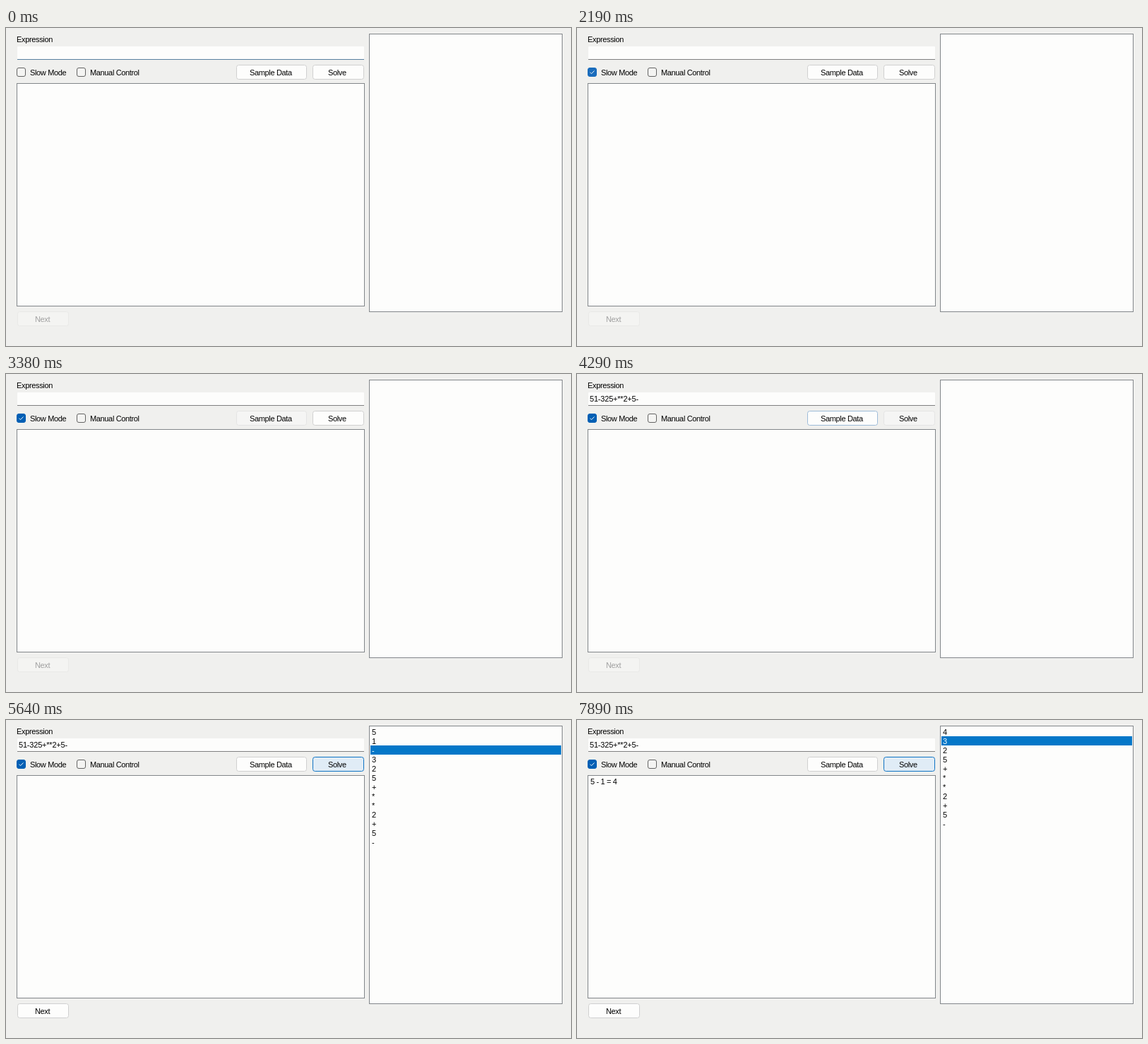
These frames come from a looping animation (800 px wide and 450 px high, 7.99 s). An HTML page:

```html
<!DOCTYPE html>
<html lang="en">
<head>
<meta charset="utf-8">
<title>Postfix solver</title>
<style>
  html, body { margin: 0; width: 100%; height: 100%; overflow: hidden; background: #f0f0ee; }
  svg { display: block; width: 800px; height: 450px; }
  text { font: 11px "Liberation Sans", Arial, sans-serif; letter-spacing: -.35px; fill: #000; white-space: pre; }
  .panel { fill: #fdfdfc; stroke: #82868a; }
  .box { fill: #f4f4f2; stroke: #636363; }
  .box.on { fill: #005fb4; stroke: #005fb4; }
  .box.hover { fill: #1a6cbc; stroke: #1a6cbc; }
  .button rect { fill: #fdfdfc; stroke: #d0d0d0; }
  .button.focus rect { stroke: #9dbbd8; }
  .button.hover rect { fill: #e0ecf6; stroke: #0f74c4; }
  .button.pressed rect { fill: #f5f5f4; stroke: #e4e4e4; }
  .button.disabled rect { fill: #f4f4f2; stroke: #e9e9e7; }
  .button.disabled text { fill: #a0a0a0; }
  .underline { stroke: #808080; }
  .underline.focus { stroke: #587f9f; }
  #expression { letter-spacing: -.2px; }
  #selection { fill: #0477c8; }
  .selected { fill: #fff; }
</style>
</head>
<body>
<svg viewBox="0 0 800 450">
  <rect width="800" height="450" fill="#f0f0ee"/>
  <text x="15" y="20">Expression</text>
  <rect x="16" y="26" width="491" height="18" rx="1" fill="#fdfdfc"/>
  <path id="underline" d="M16 44.5H507"/>
  <text id="expression" x="18" y="39"></text>

  <rect id="slow" class="box" x="15.5" y="56.5" width="12" height="12" rx="2.5"/>
  <path id="tick" d="M18.5 62.7l2 2 4-4.2" fill="none" stroke="#f0f5fa"/>
  <text x="34" y="67">Slow Mode</text>
  <rect class="box" x="100.5" y="56.5" width="12" height="12" rx="2.5"/>
  <text x="119" y="67">Manual Control</text>

  <g id="sample" class="button">
    <rect x="326.5" y="52.5" width="99" height="20" rx="3"/>
    <text x="345" y="67">Sample Data</text>
  </g>
  <g id="solve" class="button">
    <rect x="434.5" y="52.5" width="72" height="20" rx="3"/>
    <text x="456" y="67">Solve</text>
  </g>

  <rect class="panel" x="15.5" y="78.5" width="492" height="315"/>
  <text id="log" x="19" y="91"></text>
  <g id="next" class="button">
    <rect x="16.5" y="401.5" width="72" height="20" rx="3"/>
    <text x="41" y="416">Next</text>
  </g>

  <rect class="panel" x="514.5" y="8.5" width="273" height="393"/>
  <rect id="selection" x="516" width="270" height="13"/>
  <g id="rows"></g>
</svg>
<script>
const LOOP = 7990, ROW = 13;
const INPUT = "51-325+**2+5-", REDUCED = "4325+**2+5-";

// Times of the pointer's actions and the solver's steps, in ms
const CHECK = 1950, LEAVE_CHECK = 2420;
const ENTER_SAMPLE = 3060, PRESS_SAMPLE = 3330, FILL = 3450, LEAVE_SAMPLE = 3700;
const ENTER_SOLVE = 3780, PRESS_SOLVE = 4220, START = 4350;
const SECOND = 4650, OPERATOR = 4950, REDUCE = 5950, ADVANCE = 7000;

const el = id => document.getElementById(id);
const rows = [...INPUT].map((_, i) => {
  const row = document.createElementNS("http://www.w3.org/2000/svg", "text");
  row.setAttribute("x", 518);
  row.setAttribute("y", 21 + i * ROW);
  return el("rows").appendChild(row);
});

// Each step is [start time, value]; the latest one reached applies.
function stepAt(t, first, ...steps) {
  return steps.reduce((value, [start, next]) => t >= start ? next : value, first);
}

function setClass(id, base, state) {
  el(id).setAttribute("class", base + " " + state);
}

function render(t) {
  const started = t >= START;
  setClass("underline", "underline", t < CHECK ? "focus" : "");
  setClass("slow", "box", stepAt(t, "", [CHECK, "hover"], [LEAVE_CHECK, "on"]));
  el("tick").setAttribute("visibility", t >= CHECK ? "visible" : "hidden");
  setClass("sample", "button", stepAt(t, "", [ENTER_SAMPLE, "hover"], [PRESS_SAMPLE, "pressed"],
    [FILL, "hover"], [LEAVE_SAMPLE, "focus"], [START, ""]));
  setClass("solve", "button", stepAt(t, "", [ENTER_SOLVE, "hover"], [PRESS_SOLVE, "pressed"], [START, "hover"]));
  setClass("next", "button", started ? "" : "disabled");

  el("expression").textContent = t >= FILL ? INPUT : "";
  el("log").textContent = t >= REDUCE ? "5 - 1 = 4" : "";

  const tokens = stepAt(t, "", [START, INPUT], [REDUCE, REDUCED]);
  const current = stepAt(t, -1, [START, 0], [SECOND, 1], [OPERATOR, 2], [REDUCE, 0], [ADVANCE, 1]);
  el("selection").setAttribute("visibility", started ? "visible" : "hidden");
  el("selection").setAttribute("y", 10 + current * ROW);
  rows.forEach((row, i) => {
    row.textContent = tokens[i] || "";
    row.setAttribute("class", i === current ? "selected" : "");
  });
}

function frame() {
  render(performance.now() % LOOP);
  requestAnimationFrame(frame);
}
frame();
</script>
</body>
</html>
```
